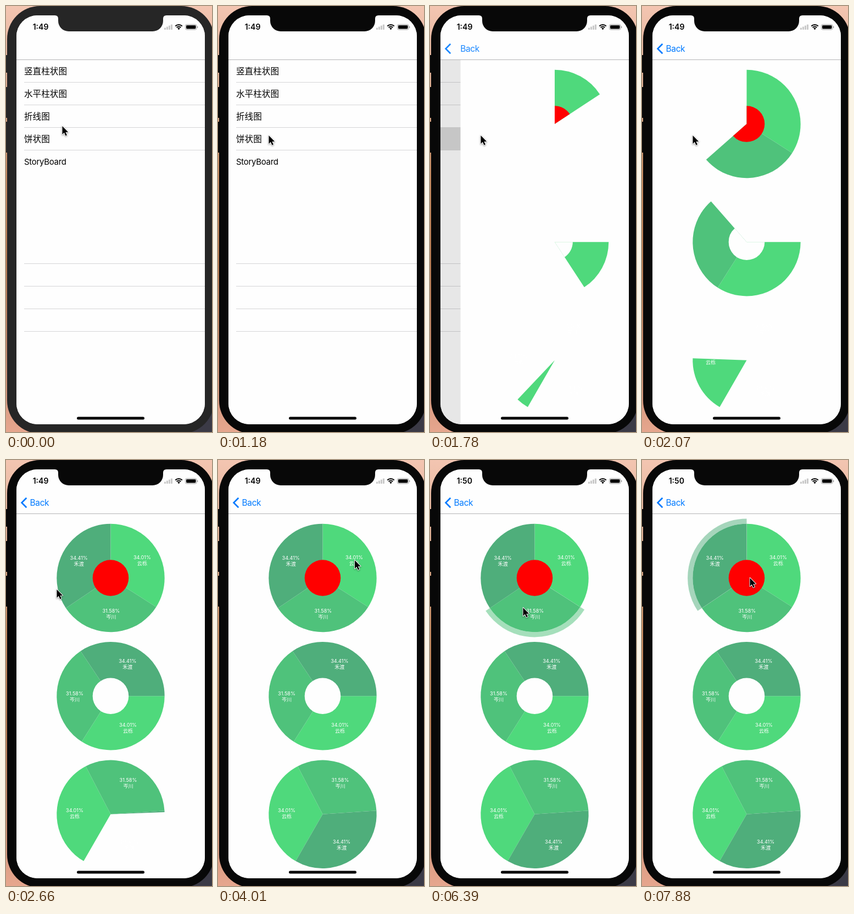
Recreate the animation shown at these times as an HTML page with a canvas. Size 375 by 773 pixels, loop 8000 ms.

```html
<!DOCTYPE html>
<html lang="zh">
<head>
<meta charset="utf-8">
<style>
html, body { margin: 0; width: 100%; height: 100%; overflow: hidden; }
canvas { display: block; width: 375px; height: 773px; }
</style>
</head>
<body>
<canvas id="stage" width="375" height="773"></canvas>
<script>
const c = document.getElementById('stage').getContext('2d');
const LOOP = 8000, PUSH = 1518, RAD = Math.PI / 180;
const PAPER = '#fefefe', BLUE = '#007aff';
const FONT = 'Inter, "Noto Sans CJK SC", "Noto Sans CJK", sans-serif';
const CX = 190.5, R = 98.2, HOLE = 32.8;

const slices = [
  { part: 34.01, name: '云栎', color: '#4fd97c' },
  { part: 31.58, name: '岑川', color: '#4fc27b' },
  { part: 34.41, name: '禾渡', color: '#4fae7b' }
];
const pies = [
  { y: 214, from: -90, time: 954, hole: '#ff0000' },
  { y: 428.2, from: 0, time: 954, hole: PAPER },
  { y: 642.8, from: 120, time: 1920, labelsFirst: true }
];
const rows = ['竖直柱状图', '水平柱状图', '折线图', '饼状图', 'StoryBoard'];

// time, x, y of the pointer tip
const pointer = [
  [140, 102.5, 218], [880, 92.5, 235], [2700, 92.5, 235], [3410, 257, 190],
  [3560, 249, 182], [4150, 249, 182], [4600, 241, 190], [5000, 241, 190],
  [5340, 140, 190], [5900, 140, 190], [6200, 169.5, 268], [6450, 169.5, 268],
  [6800, 232, 200], [6950, 232, 200], [7250, 140, 190], [7350, 140, 190],
  [7870, 196.5, 214]
];
// time, highlighted slice (-1 is none)
const taps = [[0, -1], [4160, 0], [4600, -1], [5200, 2], [6240, 1], [6840, 0], [7290, 2]];

const clamp = x => Math.max(0, Math.min(1, x));

function easeInOut(x) {
  if (x <= 0 || x >= 1) return clamp(x);
  let lo = 0, hi = 1, s;
  for (let i = 0; i < 24; i++) {
    s = (lo + hi) / 2;
    const bx = 3 * (1 - s) ** 2 * s * 0.42 + 3 * (1 - s) * s * s * 0.58 + s ** 3;
    if (bx < x) lo = s; else hi = s;
  }
  return s * s * (3 - 2 * s);
}

function rect(x, y, w, h, color, r = 0) {
  c.fillStyle = color;
  c.beginPath();
  c.roundRect(x, y, w, h, r);
  c.fill();
}

function text(str, x, y, size, color, { weight = 400, align = 'left', gap = 0 } = {}) {
  c.font = `${weight} ${size}px ${FONT}`;
  c.textAlign = align;
  c.letterSpacing = gap + 'px';
  c.fillStyle = color;
  c.fillText(str, x, y);
}

function sector(y, r, from, to, color) {
  c.fillStyle = color;
  c.beginPath();
  c.moveTo(CX, y);
  c.arc(CX, y, r, from * RAD, to * RAD);
  c.fill();
}

function drawPie(pie, t, active) {
  const p = easeInOut((t - PUSH) / pie.time), end = pie.from + 360 * p;
  let a = pie.from;
  slices.forEach((s, i) => {
    const b = a + s.part * 3.6;
    if (i === active) {
      c.globalAlpha = 0.5;
      sector(pie.y, 107.4, a, b, s.color);
      c.globalAlpha = 1;
      sector(pie.y, R, a, b, PAPER);
    }
    if (end > a) sector(pie.y, R, a, Math.min(b, end), s.color);
    a = b;
  });
  if (pie.hole && p > 0) sector(pie.y, HOLE, pie.from, end, pie.hole);
  if (p < 1 && !pie.labelsFirst) return;
  a = pie.from;
  for (const s of slices) {
    const mid = (a + s.part * 1.8) * RAD, r = (R + HOLE) / 2;
    const x = CX + r * Math.cos(mid), y = pie.y + r * Math.sin(mid);
    text(s.part.toFixed(2) + '%', x, y - 2, 9.15, '#fff', { align: 'center' });
    text(s.name, x, y + 9, 9.15, '#fff', { align: 'center' });
    a += s.part * 3.6;
  }
}

function drawList(t) {
  rect(19, 97, 343, 663, PAPER);
  const pressed = t >= 1330;
  for (const y of [138, 179, 220, 261, 467, 508, 549, 590]) rect(33, y, 329, 1, '#d5d5d7');
  if (pressed) rect(19, 220.5, 343, 41.5, '#d9d9d9');
  rows.forEach((row, i) => {
    const latin = /^\w/.test(row);
    text(row, 33, (latin ? 288.3 : 124) + (latin ? 0 : i * 41), latin ? 15 : 15.6, '#000', { gap: latin ? -0.3 : 0 });
  });
}

function drawCharts(t, active) {
  rect(19, 97, 343, 663, PAPER);
  pies.forEach((pie, i) => drawPie(pie, t, i ? -1 : active));
}

function drawBar(t, p) {
  rect(19, 17, 343, 80, PAPER);
  rect(19, 97, 343, 1, '#b4b4b6');
  text(t < 4300 ? '1:49' : '1:50', 48.7, 43, 14, '#000', { weight: 600 });
  for (let i = 0; i < 4; i++) rect(288 + i * 4, 39.5 - i * 2, 3, 3.5 + i * 2, '#c9c9c9', 0.7);

  c.strokeStyle = '#000';
  c.lineWidth = 2;
  for (const r of [9, 5.6]) {
    c.beginPath();
    c.arc(314.5, 43, r, -134 * RAD, -46 * RAD);
    c.stroke();
  }
  c.fillStyle = '#000';
  c.beginPath();
  c.moveTo(314.5, 43.2);
  c.arc(314.5, 43, 3.2, -134 * RAD, -46 * RAD);
  c.fill();

  c.strokeStyle = '#a0a0a0';
  c.lineWidth = 1;
  c.beginPath();
  c.roundRect(326.5, 33.5, 20.5, 9.5, 2.6);
  c.stroke();
  rect(328, 35, 17.5, 6.5, '#000', 1.4);
  rect(348, 36.5, 1.3, 3.5, '#a0a0a0', 0.6);

  if (p <= 0) return;
  c.globalAlpha = p;
  c.strokeStyle = BLUE;
  c.lineWidth = 2.7;
  c.beginPath();
  c.moveTo(37.3, 68.7);
  c.lineTo(28.6, 77.5);
  c.lineTo(37.3, 86.3);
  c.stroke();
  text('Back', 43.6 + 110 * (1 - p), 83, 15.5, BLUE, { gap: -0.4 });
  c.globalAlpha = 1;
}

function drawBody(bezel) {
  let g = c.createLinearGradient(0, 0, 0, 773);
  ['#f3c5b1', '#dfae92', '#c98d62', '#b97c52', '#c58a6c', '#e6a68e'].forEach((k, i) => g.addColorStop(i / 5, k));
  rect(0, 0, 375, 773, g);
  rect(300, 700, 75, 73, '#3b3a46');
  rect(2, 0, 377, 776, bezel, 60);
  for (const [y, h] of [[89, 32], [147, 56], [210, 56]]) rect(0, y, 2.5, h, bezel);
}

function drawNotch(bezel) {
  c.fillStyle = bezel;
  c.beginPath();
  c.moveTo(89, 16);
  c.lineTo(89, 17);
  c.quadraticCurveTo(95, 17, 95, 23);
  c.arcTo(95, 46, 115, 46, 19);
  c.arcTo(286, 46, 286, 26, 19);
  c.lineTo(286, 23);
  c.quadraticCurveTo(286, 17, 292, 17);
  c.lineTo(292, 16);
  c.fill();
}

function drawPointer(t) {
  let i = pointer.findIndex(k => k[0] > t);
  const b = i < 0 ? pointer[pointer.length - 1] : pointer[i];
  const a = i > 0 ? pointer[i - 1] : b;
  const u = b === a ? 0 : (t - a[0]) / (b[0] - a[0]), e = u * u * (3 - 2 * u);
  c.save();
  c.translate(a[1] + (b[1] - a[1]) * e, a[2] + (b[2] - a[2]) * e);
  c.beginPath();
  [[0, 0], [0, 15], [3.4, 11.8], [6, 17.4], [8.4, 16.3], [5.9, 10.9], [10.6, 10.7]]
    .forEach(q => c.lineTo(...q));
  c.closePath();
  c.lineJoin = 'round';
  c.lineWidth = 1.8;
  c.strokeStyle = '#fff';
  c.shadowColor = 'rgba(0,0,0,.45)';
  c.shadowBlur = 3;
  c.shadowOffsetY = 1;
  c.stroke();
  c.shadowColor = 'transparent';
  c.fillStyle = '#000';
  c.fill();
  c.restore();
}

function draw(t) {
  const bezel = t < 1180 ? '#262626' : '#080808';
  const p = 1 - (1 - clamp((t - PUSH) / 500)) ** 3;
  const active = taps.filter(k => k[0] <= t).pop()[1];
  drawBody(bezel);

  c.save();
  c.beginPath();
  c.roundRect(19, 17, 343, 742, 38);
  c.clip();
  rect(19, 17, 343, 742, PAPER);
  if (p < 1) {
    c.save();
    c.translate(-103 * p, 0);
    drawList(t);
    c.restore();
    rect(19, 97, 343, 663, `rgba(0,0,0,${0.1 * p})`);
  }
  if (p > 0) {
    c.save();
    c.translate(343 * (1 - p), 0);
    drawCharts(t, active);
    c.restore();
  }
  drawBar(t, p);
  rect(129, 745.6, 123, 5, '#000', 2.5);
  c.restore();

  drawNotch(bezel);
  drawPointer(t);
}

const start = performance.now();
function tick() {
  draw((performance.now() - start) % LOOP);
  requestAnimationFrame(tick);
}
tick();
</script>
</body>
</html>
```
